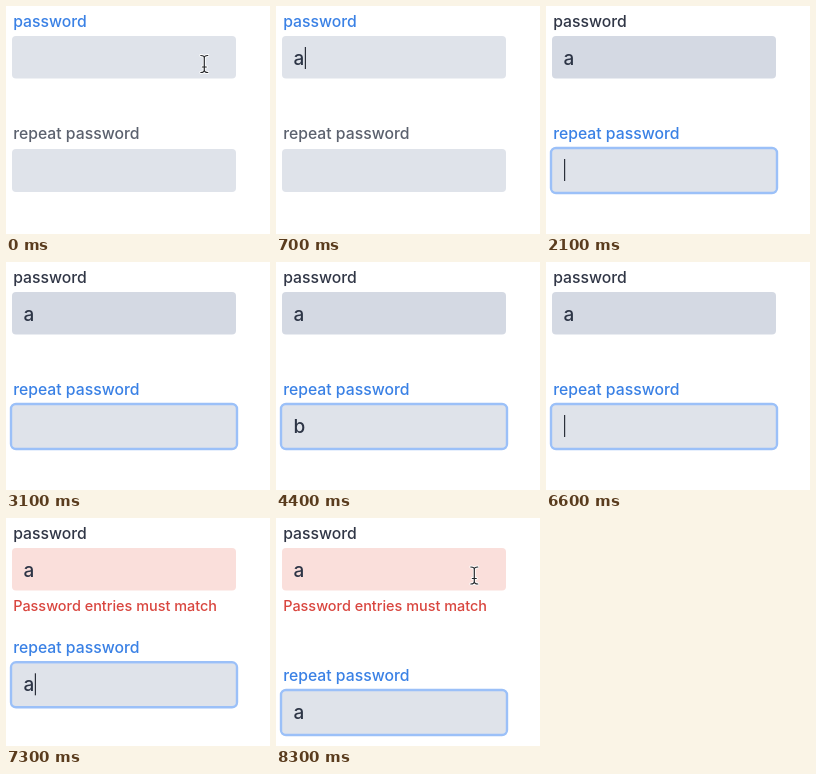
An HTML page for the animation above (8400 ms loop, 264x228 px).

```html
<!DOCTYPE html>
<html lang="en">
<head>
<meta charset="utf-8">
<style>
  html, body { margin: 0; width: 100%; height: 100%; overflow: hidden; background: #fff; }
  svg { display: block; width: 264px; height: 228px; font-family: Inter, "Open Sans", sans-serif; }
  .label { font-size: 15.75px; font-weight: 500; }
  .value { font-size: 19px; font-weight: 500; fill: #2d3546; }
  .caret { fill: #2b303a; }
  .error { font-size: 14.45px; font-weight: 500; fill: #d9463f; }
</style>
</head>
<body>
<svg viewBox="0 0 264 228">
  <g>
    <text id="label1" class="label" x="7.2" y="20.6">password</text>
    <rect id="field1" x="6" y="30" width="224" height="42.5" rx="4"/>
    <text id="value1" class="value" x="17.6" y="58.5">a</text>
    <rect id="caret1" class="caret" y="41" width="1.2" height="22"/>
    <text id="error" class="error" x="7.2" y="93.3">Password entries must match</text>
  </g>
  <g id="repeat">
    <text id="label2" class="label" x="7.2" y="132.5">repeat password</text>
    <rect id="field2" x="6" y="143" width="224" height="43" rx="4"/>
    <rect id="ring" x="5" y="142" width="226" height="45" rx="5" fill="none" stroke="#9bc0f8" stroke-width="2.4"/>
    <text id="value2" class="value" x="17.6" y="171"></text>
    <rect id="caret2" class="caret" y="153" width="1.2" height="22"/>
  </g>
  <g id="pointer" fill="none" stroke-linecap="round">
    <path stroke="#fff" stroke-width="2.8" d="M-3.5-8.5Q0-8.5 0-6V6Q0 8.5-3.5 8.5M3.5-8.5Q0-8.5 0-6V6Q0 8.5 3.5 8.5M-2 3H2"/>
    <path stroke="#26282c" stroke-width="1.2" d="M-3.5-8.5Q0-8.5 0-6V6Q0 8.5-3.5 8.5M3.5-8.5Q0-8.5 0-6V6Q0 8.5 3.5 8.5M-2 3H2"/>
  </g>
</svg>
<script>
const LOOP = 8400;
const el = Object.fromEntries([...document.querySelectorAll('[id]')].map(e => [e.id, e]));
const BLUE = [58, 129, 229], GREY = [91, 97, 110], DARK = [48, 54, 70];
const FIELD = [223, 227, 234], FILLED = [212, 217, 227], PINK = 'rgb(250, 223, 219)';

// Moments of the interaction, in ms
const TYPE_A = 200, TAB = 1900, TYPE_B = 3600, ERASE = 6000, RETYPE = 7200;

const progress = (t, start, length) => Math.min(1, Math.max(0, (t - start) / length));
const ease = p => p * p * (3 - 2 * p);
const mix = (a, b, p) => `rgb(${a.map((v, i) => Math.round(v + (b[i] - v) * p))})`;
const within = (t, spans) => spans.some(([from, to]) => t >= from && t < to);
const show = (node, on) => node.setAttribute('visibility', on ? 'visible' : 'hidden');

function placeCaret(node, filled, on) {
  node.setAttribute('x', filled ? 28.8 : 18);
  show(node, on);
}

function render(t) {
  const focus = ease(progress(t, TAB, 200));
  const invalid = t >= RETYPE;

  el.label1.setAttribute('fill', mix(BLUE, DARK, focus));
  el.label2.setAttribute('fill', mix(GREY, BLUE, focus));
  el.field1.setAttribute('fill', invalid ? PINK : mix(FIELD, FILLED, focus));
  el.field2.setAttribute('fill', mix(FIELD, FIELD, focus));
  el.ring.setAttribute('opacity', focus);

  show(el.value1, t >= TYPE_A);
  show(el.error, invalid);
  const second = invalid ? 'a' : within(t, [[TYPE_B, ERASE]]) ? 'b' : '';
  el.value2.textContent = second;

  placeCaret(el.caret1, t >= TYPE_A, within(t, [[100, 1000], [1700, TAB]]));
  placeCaret(el.caret2, second !== '',
    within(t, [[2000, 2700], [3400, 4400], [5100, 5800], [6600, 8000]]));

  const slide = 30 * ease(progress(t, RETYPE + 50, 300));
  el.repeat.setAttribute('transform', `translate(0 ${slide})`);

  show(el.pointer, t < TYPE_A || t >= 7900);
  el.pointer.setAttribute('transform', `translate(198.3 ${t < TYPE_A ? 58 : 57.5})`);
}

const start = performance.now();
function tick() {
  render((performance.now() - start) % LOOP);
  requestAnimationFrame(tick);
}
render(0);
requestAnimationFrame(tick);
</script>
</body>
</html>
```
